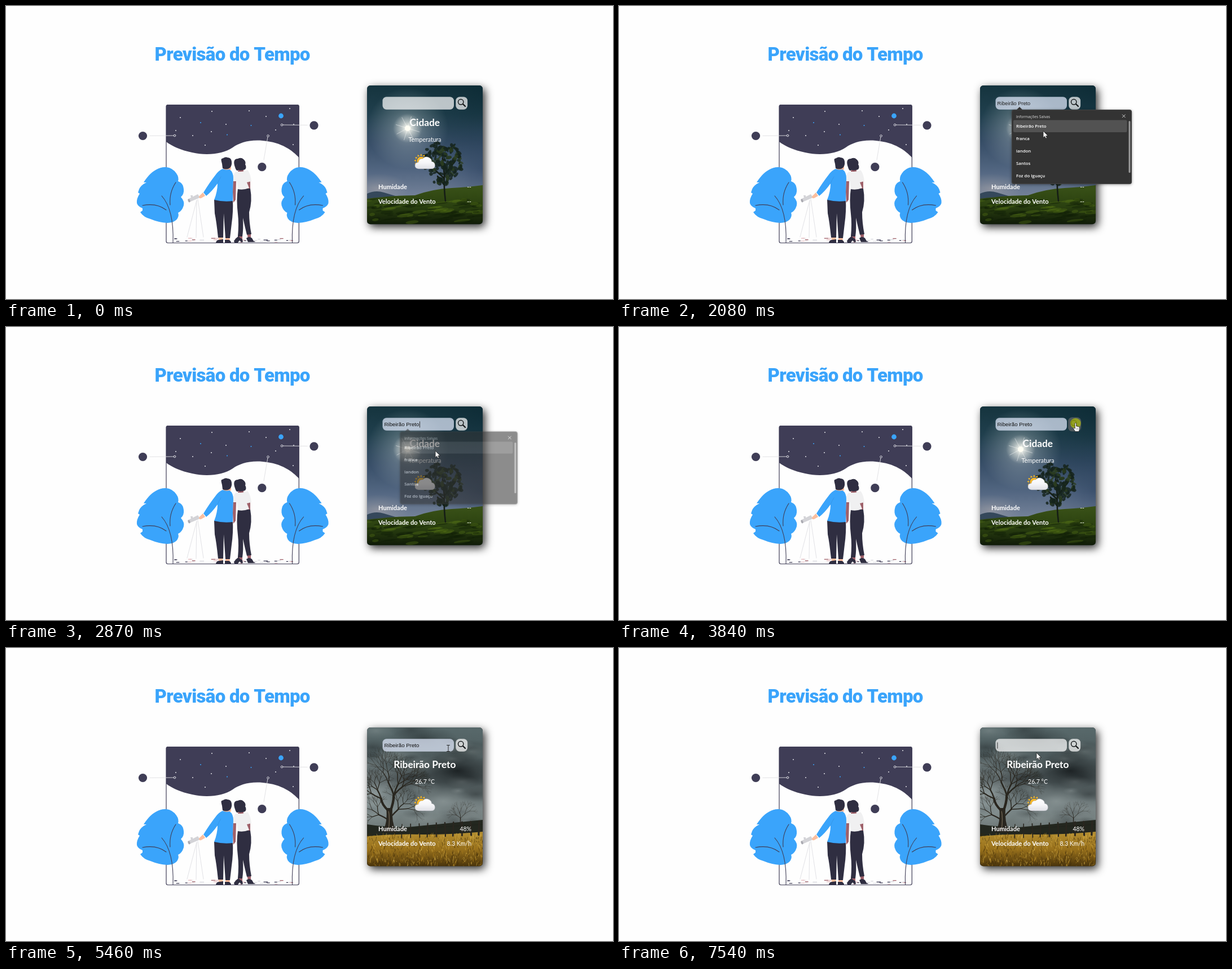
Write an HTML page with a canvas that moves like this. It is 1076x520 px and loops after 8 s.

```html
<!DOCTYPE html>
<html lang="pt">
<head>
<meta charset="utf-8">
<title>Previsão do Tempo</title>
<style>
html, body { margin: 0; width: 100%; height: 100%; overflow: hidden; background: #fefefe; }
canvas { display: block; width: 1076px; height: 520px; }
</style>
</head>
<body>
<canvas id="stage" width="1076" height="520"></canvas>
<script>
const W = 1076, H = 520, LOOP = 8000;
const BLUE = '#3aa4fb', NAVY = '#3f3d56', DARK = '#2f2e41', SKIN = '#fbbe9e', BROWN = '#9f616a', BARK = '#29261f';
const stage = document.getElementById('stage').getContext('2d');
let g = stage;

function random(seed) {
  return () => (seed = (seed * 16807) % 2147483647) / 2147483647;
}
function layer(draw) {
  const c = document.createElement('canvas');
  c.width = W; c.height = H;
  g = c.getContext('2d');
  draw();
  g = stage;
  return c;
}
function shape(d, color) {
  g.fillStyle = color;
  g.fill(new Path2D(d));
}
function stroke(d, color, width = 1) {
  g.strokeStyle = color;
  g.lineWidth = width;
  g.stroke(new Path2D(d));
}
function ellipse(x, y, rx, ry, color, turn = 0) {
  g.fillStyle = color;
  g.beginPath();
  g.ellipse(x, y, rx, ry, turn, 0, Math.PI * 2);
  g.fill();
}
const dot = (x, y, r, color) => ellipse(x, y, r, r, color);
function box(x, y, w, h, r, color) {
  g.fillStyle = color;
  g.beginPath();
  g.roundRect(x, y, w, h, r);
  g.fill();
}
function text(str, x, y, font, color, align = 'left') {
  g.font = font;
  g.fillStyle = color;
  g.textAlign = align;
  g.fillText(str, x, y);
}
function gradient(y0, y1, ...colors) {
  const f = g.createLinearGradient(0, y0, 0, y1);
  colors.forEach((c, i) => f.addColorStop(i / (colors.length - 1), c));
  return f;
}
function glow(x, y, r, rgb, alpha, squash = 1) {
  g.save();
  g.translate(x, y);
  g.scale(1, squash);
  const f = g.createRadialGradient(0, 0, 0, 0, 0, r);
  f.addColorStop(0, `rgba(${rgb},${alpha})`);
  f.addColorStop(0.45, `rgba(${rgb},${alpha * 0.45})`);
  f.addColorStop(1, `rgba(${rgb},0)`);
  g.fillStyle = f;
  g.fillRect(-r, -r, 2 * r, 2 * r);
  g.restore();
}

// ---- Illustration ----
function plant() {
  shape(`M284 286C272 285 260 293 253 301Q247 308 244 313L249 313Q239 318 236 325L234 331
    L237 333Q231 342 232 350Q234 356 242 359L242 363L238 366Q244 375 256 378Q270 384 286 385
    Q300 384 304 377Q307 371 305 367Q312 364 315 354Q317 347 310 339Q316 334 315 325Q314 316 309 313
    L305 311Q307 304 302 297Q295 287 284 286Z`, BLUE);
  stroke('M296 420C297 390 294 357 276 337M301 313Q289 331 291 353M242 354Q267 349 284 362', NAVY, 1.1);
}
function pointer(d, x, y) {
  stroke(d, '#dfdfe3', 0.9);
  g.beginPath();
  g.arc(x, y, 1.8, 0, 7);
  g.fillStyle = NAVY;
  g.fill();
  g.strokeStyle = '#e8e8ec';
  g.stroke();
}
function ground() {
  const rnd = random(77), colors = [NAVY, BROWN, '#d8d8de', '#e4e4e8', '#e4b8bc'];
  for (let i = 0; i < 46; i++) {
    g.fillStyle = colors[i % 5];
    g.fillRect(298 + rnd() * 208, 411.5 + rnd() * 7, 3 + rnd() * 5, 1.3);
  }
}
function people() {
  stroke('M338 345L321 410M338 345L337 411M340 343L350 410', '#e2e2e6', 1);
  shape('M322 343L340 334L344 340L325 348Z', '#d3d3d7');
  ellipse(324.5, 345.5, 1.8, 3, '#a9a9b0', -0.4);
  shape('M327 336L331 336L331 340L328 340Z', '#d3d3d7');

  shape('M377 409H384L385 416H377ZM389 409H396L397 416H389Z', SKIN);
  shape('M369 344H402Q403 365 400 386L397 412H389L386 368L385 411H376Q373 382 370 368Z', DARK);
  shape('M372 420Q373 415 378 415L385 414V420ZM388 420V415L395 415Q399 417 399 420Z', DARK);
  shape('M349 331L353 337L346 341Q342 342 342 338Z', SKIN);
  shape('M385 281H399V289L396 294H385Z', SKIN);
  shape(`M384 289Q390 292 396 290Q403 294 403 306L402 346Q385 348 369 344Q375 329 375 315
    Q365 329 355 337L350 331Q361 313 372 299Q377 292 384 289Z`, BLUE);
  stroke('M375 315Q378 307 381 303', '#338fdc', 0.6);
  shape(`M383 280Q380 272 385 270Q389 267 393 269Q399 269 400 276Q401 284 396 288
    Q390 291 384 288Z`, DARK);
  dot(384, 273, 2.5, DARK);

  shape('M403 309L408 310L407 344L403 349L402 330ZM427 306L433 308L433 339Q431 350 428 347L427 335Z', BROWN);
  shape('M427 402H434V413H429ZM412 404H419V414H410Z', BROWN);
  shape(`M411 324H433Q437 346 431 366Q431 385 435 405L427 406Q423 390 420 376
    Q421 395 419 409H411Q413 386 411 369Q408 344 411 324Z`, DARK);
  shape('M404 417Q408 411 412 409L419 414L420 419H417L414 416L411 420H405ZM426 412Q431 408 436 412L440 419H429Z', DARK);
  shape('M413 283H421V294H411Z', BROWN);
  shape(`M407 294Q420 295 428 291Q433 296 435 311L427 313L431 323Q421 327 411 325L409 311L403 311
    Q402 299 407 294Z`, '#f0f0f1');
  shape(`M405 283Q402 271 411 271Q417 268 421 272Q426 276 424 281Q427 286 424 290Q417 293 412 291
    Q409 294 407 289Z`, DARK);
}
function illustration() {
  g.lineCap = 'round';
  shape(`M284 178Q284 175 287 175H516.5Q519.5 175 519.5 178V269C508 257 490 242 455 239
    C430 237 414 243 402 251C385 263 355 266 330 260C310 256 295 249 284 241Z`, NAVY);
  g.strokeStyle = NAVY;
  g.lineWidth = 1.2;
  g.beginPath();
  g.roundRect(284, 175.5, 235.3, 245, 3);
  g.stroke();
  [[309, 198], [365, 187], [431, 186], [503, 182], [301, 221], [331, 230], [364, 223], [353, 247],
   [461, 196], [478, 220], [510, 210], [509, 246], [390, 210]].forEach(([x, y]) => dot(x, y, 0.9, '#f2f2f5'));
  [[345, 207], [392, 228.5], [434.5, 212]].forEach(([x, y]) => dot(x, y, 1, BLUE));
  dot(487.5, 195, 4.4, BLUE);
  dot(242.5, 230.5, 7.6, NAVY);
  dot(546, 211.8, 7.6, NAVY);
  dot(453.8, 285.7, 7.6, NAVY);
  pointer('M255 230.3L298 230', 299, 230);
  pointer('M491 211L534 211.4', 489, 211);
  pointer('M464 232L457 273', 464.5, 230.5);
  ground();
  people();
  plant();
  g.save();
  g.translate(803.5, 0);
  g.scale(-1, 1);
  plant();
  g.restore();
}

// ---- Card backdrops ----
function cardPath() {
  g.beginPath();
  g.roundRect(640, 141, 205, 246.3, 6);
}
function nightView() {
  cardPath();
  g.clip();
  g.fillStyle = gradient(141, 340, '#15343e', '#203f4d', '#364d66', '#516580', '#75839a');
  g.fillRect(640, 141, 205, 247);
  glow(845, 150, 150, '8,38,48', 0.55);
  glow(845, 290, 90, '40,62,92', 0.5);
  glow(660, 325, 55, '176,170,170', 0.5, 0.5);
  glow(712, 217, 72, '205,215,215', 0.55);
  glow(712, 217, 26, '255,255,245', 1);
  g.globalAlpha = 0.45;
  for (let a = 0; a < 8; a++) {
    const c = Math.cos(a * Math.PI / 4 + 0.3), s = Math.sin(a * Math.PI / 4 + 0.3);
    stroke(`M712 217L${712 + c * 22} ${217 + s * 22}`, '#fff', 1);
  }
  g.globalAlpha = 1;
  dot(712, 217, 5, '#fffef4');

  shape('M640 333Q655 326 670 331L700 340V350H640Z', '#35485b');
  shape('M640 342Q690 336 725 336Q755 325 790 323Q815 322 845 318V388H640Z', gradient(322, 387, '#385017', '#2b4110', '#101b08'));
  const rnd = random(31);
  for (let i = 0; i < 100; i++) {
    const x = 640 + rnd() * 205, y = 343 + rnd() * 42;
    ellipse(x, y, 5 + rnd() * 10, 1 + rnd() * 2.2, i % 3 ? 'rgba(16,30,6,.42)' : 'rgba(82,112,22,.38)', -0.12);
  }
  g.lineCap = 'round';
  stroke('M779 346Q776 322 777 300L774 270M777 306L755 286M777 300L797 274M777 318L765 302', '#151d15', 2.6);
  for (let i = 0; i < 150; i++) {
    const a = rnd() * Math.PI * 2, r = Math.sqrt(rnd());
    const x = 773 + Math.cos(a) * r * 34, y = 279 + Math.sin(a) * r * 40;
    ellipse(x, y, 2 + rnd() * 4, 1.5 + rnd() * 2.5, i % 4 ? 'rgba(21,36,28,.83)' : 'rgba(43,60,32,.8)', rnd() * 3);
  }
}
function branch(x, y, angle, length, width, depth, rnd) {
  const x2 = x + Math.cos(angle) * length, y2 = y + Math.sin(angle) * length;
  const bend = (rnd() - 0.5) * length * 0.4;
  stroke(`M${x} ${y}Q${(x + x2) / 2 + bend} ${(y + y2) / 2} ${x2} ${y2}`, BARK, width);
  if (!depth) return;
  const forks = 2 + (rnd() > 0.55);
  for (let i = 0; i < forks; i++) {
    const turn = (i - (forks - 1) / 2) * 0.65 + (rnd() - 0.5) * 0.5;
    branch(x2, y2, angle + turn, length * (0.68 + rnd() * 0.2), width * 0.58, depth - 1, rnd);
  }
}
function stormView() {
  cardPath();
  g.clip();
  g.fillStyle = gradient(141, 335, '#58696b', '#4f5c5e', '#475153', '#768283', '#68716f');
  g.fillRect(640, 141, 205, 247);
  const rnd = random(19);
  for (let i = 0; i < 46; i++) {
    const tone = i % 2 ? '22,27,29' : '152,163,163';
    glow(640 + rnd() * 205, 145 + rnd() * 165, 14 + rnd() * 32, tone, 0.34, 0.4);
  }
  glow(652, 262, 62, '172,184,184', 0.65);
  glow(775, 272, 55, '150,161,161', 0.6, 0.45);
  glow(800, 218, 75, '14,18,20', 0.75, 0.42);
  glow(740, 160, 60, '22,28,30', 0.45, 0.35);
  glow(825, 184, 42, '125,138,138', 0.5, 0.35);
  glow(822, 285, 50, '140,150,150', 0.5, 0.4);
  shape('M640 313Q672 318 710 318Q765 313 845 305V345H640Z', '#23271f');
  shape('M640 334Q690 329 740 331Q795 331 845 326V388H640Z', gradient(328, 387, '#b18c30', '#97701c', '#4a340b'));
  for (let i = 0; i < 620; i++) {
    const x = 640 + rnd() * 205, y = 334 + rnd() * 56, h = 2 + rnd() * 6;
    const color = ['rgba(226,186,78,.55)', 'rgba(58,40,8,.6)', 'rgba(175,128,28,.6)'][i % 3];
    stroke(`M${x} ${y}l${(rnd() - 0.5) * 5} ${-h}`, color, 0.9);
  }
  g.lineCap = 'round';
  shape('M667 327Q677 310 674 284L685 284Q683 307 692 328Z', BARK);
  stroke('M678 322Q681 304 678 288', '#6b604f', 1.4);
  const bare = random(8);
  branch(677, 288, -2.1, 24, 4, 5, bare);
  branch(681, 290, -1.35, 29, 4.4, 6, bare);
  branch(682, 300, -0.8, 19, 2.6, 5, bare);
  branch(676, 304, -2.65, 17, 2.2, 4, bare);
  branch(806, 315, -1.6, 13, 1.4, 4, bare);
  stroke('M700 322L845 313M700 330L845 325', 'rgba(30,28,23,.55)', 0.7);
  for (let i = 0; i < 10; i++) {
    const x = 702 + i * 15.2;
    stroke(`M${x} ${313 - i * 0.6}l${(i % 3) - 1} 24`, BARK, 1.4 + i * 0.2);
  }
}

const scene = layer(() => {
  g.fillStyle = '#fefefe';
  g.fillRect(0, 0, W, H);
  g.letterSpacing = '-0.7px';
  text('Previsão do Tempo', 263.5, 97, '900 33px Roboto, sans-serif', BLUE);
  g.letterSpacing = '0px';
  illustration();
  g.shadowColor = 'rgba(0,0,0,.85)';
  g.shadowBlur = 15;
  g.shadowOffsetX = 4;
  g.shadowOffsetY = 5;
  g.fillStyle = '#333';
  cardPath();
  g.fill();
});
const night = layer(nightView);
const storm = layer(stormView);

// ---- Interface ----
const SUGGESTIONS = ['Ribeirão Preto', 'franca', 'landon', 'Santos', 'Foz do Iguaçu'];
const CITY = SUGGESTIONS[0];
const PATH = [
  [430, 967, 503], [700, 862, 350], [950, 762, 202], [1110, 736, 164], [1800, 736, 166], [2080, 752, 222],
  [2200, 755, 230], [2400, 757, 222], [2600, 757, 222], [2870, 761, 220], [3010, 768, 212], [3370, 798, 184],
  [3440, 800, 181], [3580, 809, 171], [4240, 810, 171], [4630, 810, 171], [4800, 800, 175], [5130, 784, 178],
  [5730, 784, 178], [5870, 715, 184], [6010, 580, 196], [6150, 582, 196], [6400, 672, 178], [6600, 684, 178],
  [6940, 743, 187], [7470, 743, 187], [7540, 740, 186]
];
const CLICKS = [1320, 2670, 3840];
const between = (t, a, b) => t >= a && t < b;

function cursorAt(t) {
  const i = PATH.findIndex(p => p[0] > t);
  if (i < 0) return PATH[PATH.length - 1].slice(1);
  if (i === 0) return null;
  const [t0, x0, y0] = PATH[i - 1], [t1, x1, y1] = PATH[i], k = (t - t0) / (t1 - t0);
  return [x0 + (x1 - x0) * k, y0 + (y1 - y0) * k];
}
function weatherIcon() {
  const sun = '#f9b826';
  for (let i = 0; i < 7; i++) {
    g.save();
    g.translate(736, 275);
    g.rotate(Math.PI * 0.86 + i * 0.5);
    shape('M9.3 -2L12.8 0L9.3 2Z', sun);
    g.restore();
  }
  dot(736, 275, 7.6, sun);
  const cloud = 'M731 289Q724.5 288 725 283Q725 278 731 277.5Q732 270 739 271Q743 265.5 750 269Q755 272 754.5 276Q760.5 277 760.5 283Q760 289 754 289Z';
  shape(cloud, gradient(267, 289, '#ffffff', '#f6f6f8', '#dfe0e5'));
  stroke(cloud, 'rgba(160,162,170,.6)', 0.7);
}
function weatherText(found) {
  const bold = 'bold 11.1px Lato, sans-serif', plain = '10.5px Lato, sans-serif';
  text(found ? CITY : 'Cidade', 742.3, 212.6, 'bold 17.3px Lato, sans-serif', '#fff', 'center');
  text(found ? '26.7 °C' : 'Temperatura', 742.5, 240.6, plain, '#fff', 'center');
  text('Humidade', 660, 324.5, bold, '#fff');
  text('Velocidade do Vento', 660, 350.8, bold, '#fff');
  text(found ? '48%' : '--', 825, 324.5, plain, '#fff', 'right');
  text(found ? '8.3 Km/h' : '--', 825, 350.8, plain, '#fff', 'right');
}
function hoveredRow(t) {
  if (t < 1980) return -1;
  return between(t, 2150, 2320) ? 1 : 0;
}
function searchBar(t) {
  const filled = between(t, 2800, 6150), preview = between(t, 1980, 2800);
  box(667.5, 161.3, 126.5, 22.4, 7, filled || preview ? 'rgba(226,235,252,.72)' : 'rgba(255,255,255,.71)');
  if (preview) text(SUGGESTIONS[hoveredRow(t)], 670.5, 175.8, '9.2px "Liberation Sans", sans-serif', '#222');
  if (filled) {
    const font = '9.7px "Liberation Sans", sans-serif';
    text(CITY, 670.5, 175.8, font, '#111');
    if (t > 5730) {
      const x = Math.max(670.5, Math.min(733, cursorAt(t)[0]));
      g.save();
      g.beginPath();
      g.rect(x, 167, 733 - x, 12);
      g.clip();
      g.fillStyle = '#1a73d8';
      g.fillRect(x, 167, 733 - x, 12);
      text(CITY, 670.5, 175.8, font, '#fff');
      g.restore();
    }
  }
  const caret = between(t, 1320, 1820) || between(t, 6370, 6870) || between(t, 7470, 7970);
  g.fillStyle = '#222';
  if (caret) g.fillRect(670.5, 167.5, 0.9, 11);
  if (between(t, 2800, 3340)) g.fillRect(733, 167.5, 0.9, 11);

  if (between(t, 3510, 4720)) box(796.2, 160.3, 23, 25, 7, 'rgba(104,106,106,.68)');
  else box(797.3, 161.3, 20.8, 22.4, 7, 'rgba(255,255,255,.71)');
  g.lineCap = 'round';
  g.beginPath();
  g.arc(806.2, 170.3, 4.7, 0, 7);
  g.strokeStyle = '#16191b';
  g.lineWidth = 1.5;
  g.stroke();
  stroke('M810 174L814 178', '#16191b', 2.3);
}
function menu(row) {
  g.save();
  g.shadowColor = 'rgba(0,0,0,.4)';
  g.shadowBlur = 5;
  g.shadowOffsetY = 1;
  box(696, 184, 213, 132, 4, '#333333');
  g.restore();
  shape('M704.5 184.5L710 179L715.5 184.5Z', '#333333');
  g.strokeStyle = '#4b4b4b';
  g.lineWidth = 0.8;
  g.beginPath();
  g.roundRect(696.4, 184.4, 212.2, 131.2, 4);
  g.stroke();
  if (row >= 0) box(699, 202.5 + row * 21.8, 201.5, 21.5, 2, '#525252');
  text('Informações Salvas', 704, 198.6, '6.7px "Open Sans", sans-serif', '#dedede');
  SUGGESTIONS.forEach((s, i) => text(s, 704, 216.3 + i * 21.8, '600 7.8px "Open Sans", sans-serif', '#fff'));
  stroke('M892 192.5L897.6 198.1M897.6 192.5L892 198.1', '#e0e0e0', 0.9);
  box(903.5, 204, 3, 92, 1.5, '#999999');
}
const menus = [-1, 0, 1].map(row => layer(() => menu(row)));

function dropdown(t) {
  let alpha = 0;
  if (between(t, 1390, 2800)) alpha = Math.min(1, (t - 1350) / 210);
  else if (t >= 2800) alpha = 1 - (Math.floor((t - 2800) / 70) + 1) * 0.22;
  if (alpha <= 0) return;
  const scale = 1 - 0.05 * (1 - alpha);
  g.save();
  g.globalAlpha = alpha;
  g.translate(802.5, 250);
  g.scale(scale, scale);
  g.drawImage(menus[hoveredRow(t) + 1], -802.5, -250);
  g.restore();
}
function cursor(t) {
  const at = cursorAt(t);
  if (!at) return;
  const [x, y] = at;
  if (CLICKS.some(c => between(t, c, c + 70))) dot(x, y, 9.3, 'rgba(190,205,0,.62)');
  const inField = x > 667 && x < 794 && y > 161 && y < 184 || between(t, 5730, 6300);
  g.save();
  g.translate(x, y);
  g.lineJoin = 'round';
  if (inField) {
    stroke('M-2.5 -5.5H2.5M0 -5.5V5.5M-2.5 5.5H2.5', '#1b1b1b', 0.9);
  } else if (between(t, 3510, 4720)) {
    const hand = 'M-1.2 0Q0 -1.5 1.2 0V5L6 6Q7.2 6.5 7 9Q7 12 5.5 14.5H-.5Q-3 11.5-4.2 8.5Q-3.8 7-1.2 9Z';
    shape(hand, '#fff');
    stroke(hand, '#222', 0.8);
    stroke('M2 8V11M4.3 8V11', '#555', 0.6);
  } else {
    const arrow = 'M0 0V11.5L2.7 9.2L4.5 13L6.4 12.1L4.7 8.4H8.2Z';
    shape(arrow, '#fff');
    stroke(arrow, '#222', 0.8);
  }
  g.restore();
}
function render(t) {
  g.drawImage(scene, 0, 0);
  g.drawImage(t < 4240 ? night : storm, 0, 0);
  searchBar(t);
  weatherText(t >= 3910);
  weatherIcon();
  dropdown(t);
  cursor(t);
}
function tick() {
  render(performance.now() % LOOP);
  requestAnimationFrame(tick);
}
tick();
</script>
</body>
</html>
```
